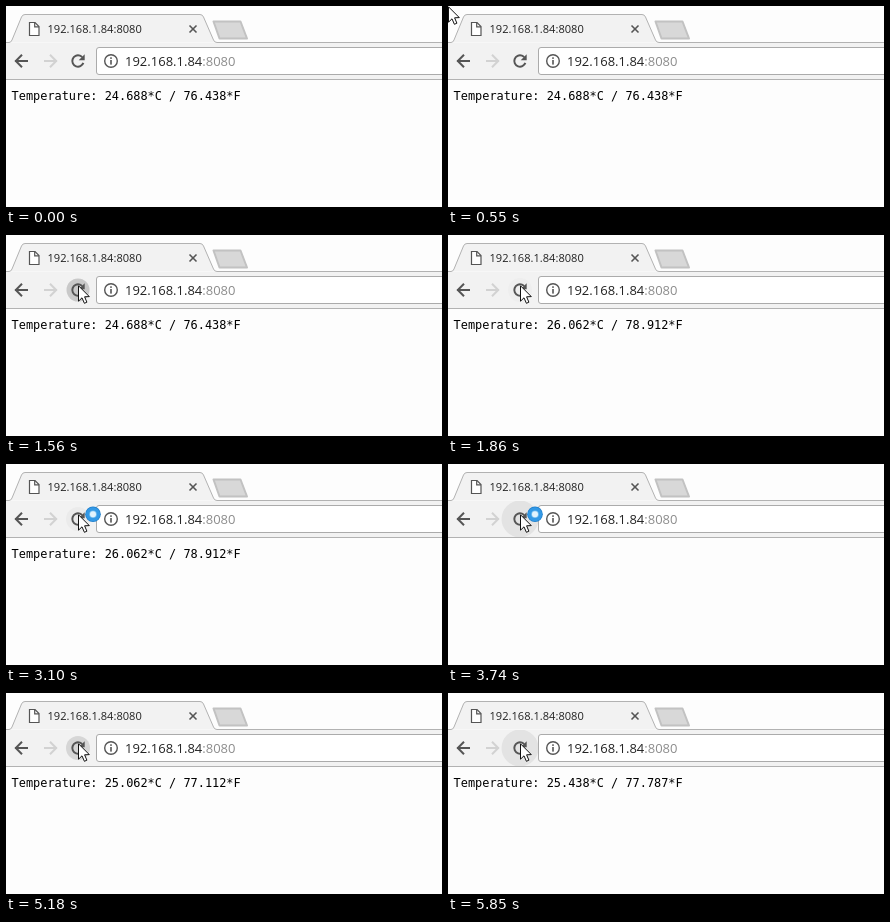
Animation of 436 by 201 pixels, one loop 8000 ms. Source, as an HTML page with a canvas:

```html
<!DOCTYPE html>
<html lang="en">
<head>
<meta charset="utf-8">
<title>Temperature</title>
<style>
html, body { margin: 0; width: 100%; height: 100%; overflow: hidden; background: #fdfdfd; }
canvas { display: block; width: 436px; height: 201px; }
</style>
</head>
<body>
<canvas id="stage"></canvas>
<script>
const W = 436, H = 201, LOOP = 8000;
const canvas = document.getElementById('stage');
const ratio = window.devicePixelRatio || 1;
canvas.width = W * ratio;
canvas.height = H * ratio;
const ctx = canvas.getContext('2d');
const UI = '"Open Sans", "Noto Sans", sans-serif';
const MONO = '"DejaVu Sans Mono", "Noto Sans Mono", monospace';
const BAR = '#f2f2f2', EDGE = '#b2b2b2', INK = '#555';

// Each track lists [start time, value]; values hold until the next entry.
const pointer = [
  [0, null], [250, [50, 46]], [400, null], [550, [0, 0]], [700, [104, 60]],
  [850, [123, 68]], [1000, [94, 44]], [1150, [82, 46]], [1280, [72, 46]], [1430, [72, 50]]
];
const reading = [
  [0, '24.688*C / 76.438*F'], [1710, '26.062*C / 78.912*F'], [3740, null],
  [3860, '25.062*C / 77.112*F'], [5730, '25.438*C / 77.787*F']
];
const ripple = [
  [0, null], [1430, [11.5, '#dddddd']], [1560, [11.5, '#c9c9c9']],
  [1710, [12, '#e4e4e4']], [1860, [12, '#eeeeee']], [3100, [12, '#ebebeb']],
  [3620, [14, '#dddddd']], [3740, [18.5, '#e3e3e3']], [3860, null],
  [5180, [12, '#d6d6d6']], [5730, [16, '#dddddd']], [5850, [18.5, '#e3e3e3']]
];
const busy = [[0, false], [3100, true], [4500, false]];

function at(track, t) {
  let value = track[0][1];
  for (const [start, v] of track) if (t >= start) value = v;
  return value;
}

function line(points, color, width, closed, fill) {
  ctx.beginPath();
  points.forEach(([x, y]) => ctx.lineTo(x, y));
  if (closed) ctx.closePath();
  if (fill) { ctx.fillStyle = fill; ctx.fill(); }
  if (color) { ctx.strokeStyle = color; ctx.lineWidth = width; ctx.stroke(); }
}

function disc(x, y, r, fill) {
  ctx.beginPath();
  ctx.arc(x, y, r, 0, Math.PI * 2);
  ctx.fillStyle = fill;
  ctx.fill();
}

function label(str, x, y, font, color) {
  ctx.font = font;
  ctx.fillStyle = color;
  ctx.fillText(str, x, y);
  return ctx.measureText(str).width;
}

function drawTabs() {
  ctx.fillStyle = BAR;
  ctx.fillRect(0, 37, W, 36);
  ctx.fillRect(0, 73, W, 0.5);
  ctx.beginPath();
  ctx.moveTo(0, 36.5);
  ctx.lineTo(3, 36.5);
  ctx.quadraticCurveTo(5, 36.5, 6, 34);
  ctx.lineTo(15.5, 11);
  ctx.quadraticCurveTo(16.5, 8.5, 19, 8.5);
  ctx.lineTo(194, 8.5);
  ctx.quadraticCurveTo(196.5, 8.5, 197.5, 11);
  ctx.lineTo(207.5, 34);
  ctx.quadraticCurveTo(208.5, 36.5, 211, 36.5);
  ctx.fillStyle = BAR;
  ctx.fill();
  ctx.lineTo(W, 36.5);
  ctx.strokeStyle = EDGE;
  ctx.lineWidth = 1;
  ctx.stroke();
  line([[0, 73.5], [W, 73.5]], EDGE, 1);

  ctx.lineJoin = 'round';
  line([[207.5, 15.5], [234.5, 15.5], [241, 32.5], [213.5, 32.5]], '#c2c2c2', 2, true, '#d8d8d8');
  ctx.lineJoin = 'miter';

  line([[23.5, 16.5], [29, 16.5], [33, 20.5], [33, 29.5], [23.5, 29.5]], INK, 1.2, true, '#fff');
  line([[28.7, 16.5], [28.7, 20.8], [33, 20.8]], INK, 1.2);
  label('192.168.1.84:8080', 41.5, 27, '11.1px ' + UI, '#222');
  line([[183.5, 19.5], [190.5, 26.5]], INK, 1.6);
  line([[190.5, 19.5], [183.5, 26.5]], INK, 1.6);
}

function arrow(x, dir, color) {
  line([[x, 55], [x + dir * 13, 55]], color, 2);
  line([[x + dir * 7, 48.7], [x + dir * 0.8, 55], [x + dir * 7, 61.3]], color, 2);
}

function drawReload(spot) {
  if (spot) {
    ctx.save();
    ctx.beginPath();
    ctx.rect(50, 37, 40, 36);
    ctx.clip();
    disc(72, 55, spot[0], spot[1]);
    ctx.restore();
  }
  ctx.beginPath();
  ctx.arc(72, 55, 5.7, 0.35, Math.PI * 1.76);
  ctx.strokeStyle = INK;
  ctx.lineWidth = 2;
  ctx.stroke();
  line([[78.7, 48.3], [78.7, 54.3], [72.7, 54.3]], null, 0, true, INK);
}

function drawAddress() {
  ctx.beginPath();
  ctx.roundRect(90.5, 41.5, 360, 27, 2.5);
  ctx.fillStyle = '#fff';
  ctx.fill();
  ctx.strokeStyle = '#ababab';
  ctx.lineWidth = 1;
  ctx.stroke();
  ctx.beginPath();
  ctx.arc(105, 55, 6.3, 0, Math.PI * 2);
  ctx.strokeStyle = INK;
  ctx.lineWidth = 1.4;
  ctx.stroke();
  ctx.fillStyle = INK;
  ctx.fillRect(104.2, 51.3, 1.6, 1.6);
  ctx.fillRect(104.2, 54, 1.6, 4.6);
  const font = '13px ' + UI;
  const w = label('192.168.1.84', 119, 60, font, '#222');
  label(':8080', 119 + w, 60, font, '#8c8c8c');
}

function drawPointer([x, y]) {
  ctx.save();
  ctx.translate(x, y);
  line([[0.5, 0.8], [0.5, 16.2], [4, 12.8], [6.4, 18.3], [8.9, 17.2],
    [6.6, 11.8], [11.3, 11.6]], '#111', 1, true, '#fff');
  ctx.restore();
}

function drawBusy() {
  disc(87, 50.3, 7.8, '#1f7fcb');
  disc(87, 50.3, 7, '#3399e6');
  disc(87, 50.3, 3.8, '#78c0f0');
  disc(87, 50.3, 3, '#e2f3fd');
}

function draw(t) {
  ctx.setTransform(ratio, 0, 0, ratio, 0, 0);
  ctx.fillStyle = '#fdfdfd';
  ctx.fillRect(0, 0, W, H);
  drawTabs();
  arrow(9, 1, INK);
  arrow(51, -1, '#d2d2d2');
  drawReload(at(ripple, t));
  drawAddress();
  const value = at(reading, t);
  if (value) label('Temperature: ' + value, 5.6, 94, '11.9px ' + MONO, '#000');
  const pos = at(pointer, t);
  if (pos) drawPointer(pos);
  if (at(busy, t)) drawBusy();
}

const begin = performance.now();
function tick() {
  draw((performance.now() - begin) % LOOP);
  requestAnimationFrame(tick);
}
tick();
</script>
</body>
</html>
```
